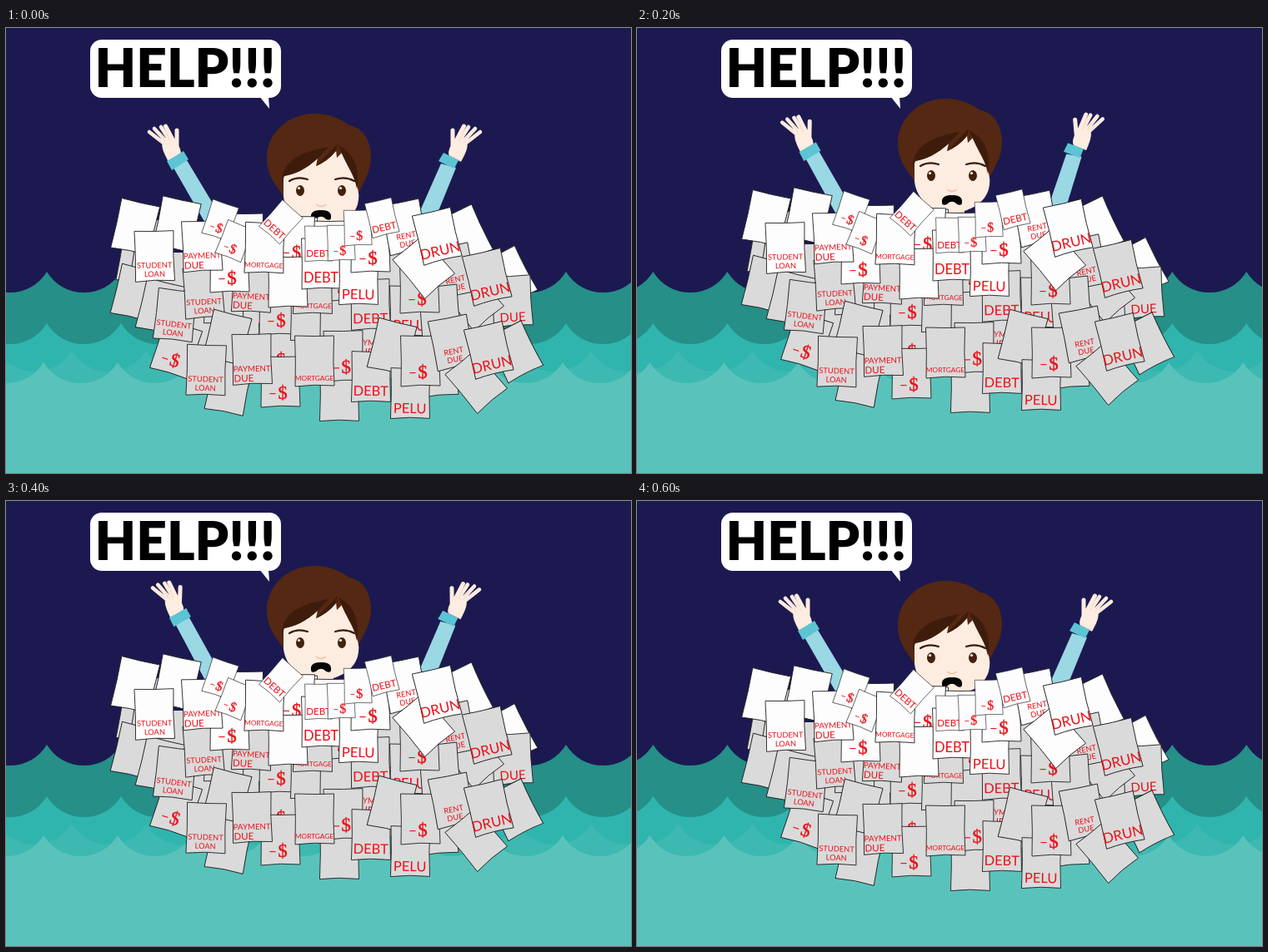
An HTML page for the animation above (0.7 s loop, 750x535 px).

```html
<!DOCTYPE html>
<html lang="en">
<head>
<meta charset="utf-8">
<title>Help</title>
<style>
  html, body { margin: 0; width: 100%; height: 100%; overflow: hidden; background: #1c1951; }
  svg { display: block; width: 100vw; height: 100vh; }
  text { font-family: Lato, sans-serif; text-anchor: middle; }
  #pile text { fill: #ea1119; }
  #pile .cash { font-family: "Liberation Serif", serif; font-size: 23px; stroke: #ea1119; stroke-width: .4; }
  .sheet { stroke: #222; stroke-width: .9; }
</style>
</head>
<body>
<svg id="stage" viewBox="0 0 750 535">
  <defs>
    <g id="hand" fill="#fdece0" stroke="#fdece0" stroke-linecap="round">
      <path d="M195 160 C188 147 185 139 191 133 Q199 130 204 137 Q211 147 209 153Z"/>
      <path d="M172 125L190 139M178 121L193 137M186 119L197 136" fill="none" stroke-width="4.6"/>
      <path d="M191.500 118L201 136M205 123L205 141" fill="none" stroke-width="5"/>
      <path d="M183 133L188 140M186 127L191 137M193 127L197 136" fill="none" stroke="#ecd3c6" stroke-width=".8"/>
    </g>
  </defs>
  <rect width="750" height="535" fill="#1c1951"/>
  <g id="sea"></g>

  <g id="armL">
    <path d="M201 168L217 159L256 224L248 250Z" fill="#9ad8e4"/>
    <use href="#hand"/>
    <path d="M193 160L213 148L219 158L199 171Z" fill="#5cc4d4"/>
  </g>
  <g id="armR">
    <path d="M522 163L540 168L514 232L488 240Z" fill="#9ad8e4"/>
    <use href="#hand" transform="translate(741) scale(-1 1)"/>
    <path d="M525 150L543 159L538 169L519 160Z" fill="#5cc4d4"/>
  </g>

  <g id="head">
    <path d="M364 220H393V260H364Z" fill="#e9cfc4"/>
    <path d="M334 204C326 190 313 180 313 156C313 127 338 103 370 103C387 103 401 109 412 117C430 120 438 138 438 155C438 174 428 187 421 202Z" fill="#542812"/>
    <path d="M333 178C346 176 361 169 374 156L372 166C381 162 389 157 396 147L397 156L403 150C409 163 419 172 421 190Q425 200 422 212C417 229 398 240 378 240C354 240 336 225 333 203Z" fill="#fdece0"/>
    <path d="M331 187C330 162 350 149 387 143L374 157C360 170 346 176 334 178ZM374 164L398 139L396 148Q386 160 372 166ZM399 141C419 151 425 172 421 193C418 175 407 164 399 141Z" fill="#3e1c0c"/>
    <path d="M340 184Q350 178 362 182M395 182Q407 178 418 184" fill="none" stroke="#3a1a0b" stroke-width="2.2" stroke-linecap="round"/>
    <g fill="#44210f"><ellipse cx="353" cy="195.500" rx="5" ry="6.500"/><ellipse cx="403" cy="195.500" rx="5" ry="6.500"/></g>
    <g fill="#fff"><circle cx="351.500" cy="192.500" r="1.600"/><circle cx="401.500" cy="192.500" r="1.600"/></g>
    <path d="M372 212Q378 217 384 212" fill="none" stroke="#f4c6b8" stroke-width="1.800"/>
    <path d="M366 228C365 220 372 219 378 219C384 219 391 220 390 228C390 232 385 231 383 229C380 226 376 226 373 229C371 231 366 232 366 228Z" fill="#050505"/>
  </g>

  <g id="pile"></g>

  <rect x="101" y="14" width="229" height="70" rx="14" fill="#fff"/>
  <path d="M304 82L316 97L315 82Z" fill="#fff"/>
  <text x="215" y="71" font-size="64" font-weight="900">HELP!!!</text>
</svg>
<script>
const $ = id => document.getElementById(id);
const WHITE = '#fdfdfd', GREY = '#dadada', PERIOD = 89;
const sea = $('sea'), pile = $('pile');

// A row of circular troughs meeting in cusps, filled down to the floor.
function wave(x, y, color) {
  let d = `M${x - 3 * PERIOD} ${y}`;
  for (let i = 0; i < 14; i++) d += `a52 52 0 0 0 ${PERIOD} 0`;
  sea.innerHTML += `<path d="${d}V535H${x - 3 * PERIOD}Z" fill="${color}"/>`;
}
wave(49, 293, '#258f88');
wave(49, 355, '#2fb5ae');
wave(-10, 388, '#3db9b1');
wave(45, 402, '#59c3bb');

const line = (s, y, size, x = 0) => `<text x="${x}" y="${y}" font-size="${size}">${s}</text>`;
const labels = {
  student: line('STUDENT', 14.5, 9.3) + line('LOAN', 25, 9.3),
  payment: line('PAYMENT', 15, 9.7) + line('DUE', 27, 11.5, -10),
  rent: line('RENT', 14, 9.3) + line('DUE', 24, 9.3),
  mortgage: line('MORTGAGE', 24, 8.3),
  due: line('DUE', 25, 15),
  debt: line('DEBT', 23, 16.5),
  cardA: line('DRUN', 24, 17),
  cardB: line('PELU', 24, 16.5),
  cash: line('–', 20, 18, -9) + '<text class="cash" x="3" y="21">$</text>'
};

function paper(fill, x, y, turn = 0, label = '', size = 1) {
  return `<g transform="translate(${x} ${y}) rotate(${turn}) scale(${size})">
    <path class="sheet" fill="${fill}" d="M-23.5-30Q0-29 23.5-30Q22 0 24 30Q0 28-23 31Q-22 0-23.5-30Z"/>
    ${labels[label] || ''}</g>`;
}
let sheets = '';
const white = (...a) => sheets += paper(WHITE, ...a);
const grey = (...a) => sheets += paper(GREY, ...a);
const small = (x, y, turn, label) => white(x, y, turn, label, .7);

// Middle rows, behind
sheets += `<path d="M170 270H595V380L560 420H240L185 380Z" fill="${GREY}"/>`;
white(550, 249, -25);
white(603, 299, -27);
grey(607, 328, -3, 'due');
grey(560, 326, -39);
grey(537, 292, -12, 'rent');
grey(577, 299, -13, 'cardA');
grey(160, 276, 10);
grey(178, 260, 8);
grey(155, 318, 14);
grey(185, 335, 14);
grey(204, 386, 18, 'cash');
grey(203, 345, 7, 'student');
grey(262, 325, 3);
grey(237, 318, -3, 'student');
grey(327, 385, 0, 'cash');
grey(327, 338, 0, 'cash');
grey(295, 311, 3, 'payment');
grey(365, 345, 1);
grey(400, 340);
grey(400, 298, 0, 'cash');
grey(368, 313, 1, 'mortgage');
grey(440, 367, 4, 'payment');
grey(484, 340, 0, 'cardB');
grey(437, 332, -1, 'debt');
grey(520, 340, -5);
grey(496, 312, 0, 'cash');

// Top rows
white(155, 239, 13);
white(205, 236, 12);
white(178, 274, -1, 'student');
white(285, 253);
white(268, 287, 0, 'cash');
white(235, 262, -2, 'payment');
small(257, 231, 19, 'cash');
small(274, 256, 22, 'cash');
white(350, 258);
white(388, 262);
white(346, 256, 2, 'cash');
white(338, 305);
white(310, 264, 2, 'mortgage');
small(330, 233, 42, 'debt');
white(378, 283, 0, 'debt');
small(375, 259, 0, 'debt');
white(423, 302, 1, 'cardB');
white(437, 263, 0, 'cash');
small(402, 258, -1, 'cash');
white(478, 239, -11, 'rent');
small(422, 240, -1, 'cash');
small(451, 228, -13, 'debt');
white(501, 287, -39);
white(517, 250, -13, 'cardA');

// Bottom rows, in front
grey(265, 373, 14);
grey(267, 432, 12);
grey(240, 411, 2, 'student');
grey(329, 425, 0, 'cash');
grey(295, 398, -1, 'payment');
grey(400, 442, 1);
grey(405, 394, -1, 'cash');
grey(370, 400, 0, 'mortgage');
grey(438, 419, 1, 'debt');
grey(463, 383, 14);
grey(517, 412, -4);
grey(485, 439, 1, 'cardB');
grey(497, 400, 0, 'cash');
grey(535, 378, -11, 'rent');
grey(564, 425, -39);
grey(610, 389, -26);
grey(579, 387, -13, 'cardA');
pile.innerHTML = sheets;

// Poses are held for one step each.
const STEP = 100;
const pileY = [0, -3, -10, -15, -18, -12, -4];
const headY = [0, -5, -18, -24, -25, -19, -7];
const leftTurn = [0, .4, 1.1, 1.7, 2, .8, 0];
const rightTurn = [0, -2, -5, -2.5, -.5, .3, 0];
const drift = [0, 1, 2, 3, 3, 4, 5];

function move(id, x, y, more = '') {
  $(id).setAttribute('transform', `translate(${x} ${y}) ${more}`);
}
function draw() {
  const k = Math.floor(performance.now() / STEP) % pileY.length;
  move('sea', drift[k] * PERIOD / 3 % PERIOD, 0);
  move('pile', 0, pileY[k]);
  move('head', 0, headY[k]);
  move('armL', 0, pileY[k], `rotate(${leftTurn[k]} 248 240)`);
  move('armR', 0, pileY[k], `rotate(${rightTurn[k]} 500 240)`);
  requestAnimationFrame(draw);
}
draw();
</script>
</body>
</html>
```
